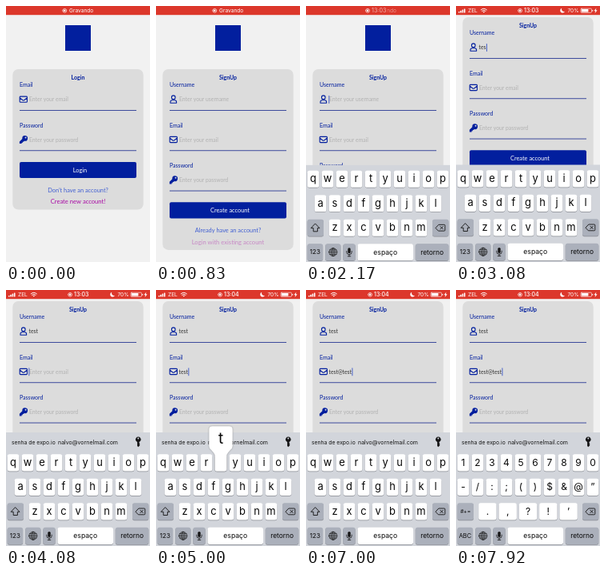
Recreate the animation shown at these times as an HTML page with a canvas. Size 180 px wide and 320 px high, loop 8000 ms.

```html
<!DOCTYPE html>
<html lang="pt">
<head>
<meta charset="utf-8">
<title>Sign up</title>
<style>
html, body { margin: 0; width: 100%; height: 100%; overflow: hidden; background: #f1f1f1; }
canvas { display: block; width: 180px; height: 320px; }
</style>
</head>
<body>
<canvas id="stage"></canvas>
<script>
const LOOP = 8000;
const BLUE = '#021f9e', RED = '#dc372b', PAGE = '#f1f1f1', CARD = '#dcdcdc';
const UI = 'Inter, sans-serif', APP = 'Lato, sans-serif';
const ROW = 50.3;           // distance between form fields
const KEY_W = 14.6, KEY_H = 21.2, PITCH = 18, KEY_ROW = 30.5, KEYS_TOP = 205.3, BOARD_TOP = 198.5;

const canvas = document.getElementById('stage');
const ctx = canvas.getContext('2d');
const scale = Math.max(1, window.devicePixelRatio || 1);
canvas.width = 180 * scale;
canvas.height = 320 * scale;

const typed = [
  { word: 'test', at: [2620, 2780, 2930, 3170] },
  { word: 'test@test', at: [4370, 4560, 4740, 4920, 5700, 6200, 6400, 6600, 6800] }
];
const letters = ['qwertyuiop', 'asdfghjkl', 'zxcvbnm'];
const symbols = ['1234567890', '-/:;()$&@”', '.,?!’'];

const progress = (t, from, to) => Math.min(1, Math.max(0, (t - from) / (to - from)));
const smooth = p => p * p * (3 - 2 * p);

function text(str, x, y, size, color, { font = APP, weight = 400, align = 'left' } = {}) {
  ctx.font = `${weight} ${size}px ${font}`;
  ctx.textAlign = align;
  ctx.textBaseline = 'alphabetic';
  ctx.fillStyle = color;
  ctx.fillText(str, x, y + size * 0.34);
}

function box(x, y, w, h, r, color) {
  ctx.fillStyle = color;
  ctx.beginPath();
  ctx.roundRect(x, y, w, h, r);
  ctx.fill();
}

function line(d, color, width = 1) {
  ctx.strokeStyle = color;
  ctx.lineWidth = width;
  ctx.lineJoin = ctx.lineCap = 'round';
  ctx.stroke(new Path2D(d));
}

function shape(d, color) {
  ctx.fillStyle = color;
  ctx.fill(new Path2D(d), 'evenodd');
}

function at(x, y, draw, alpha = 1) {
  ctx.save();
  ctx.translate(x, y);
  ctx.globalAlpha *= alpha;
  draw();
  ctx.restore();
}

// Field icons, centred on the origin
const icons = {
  Username() {
    line('M-2.3 -2.5a2.3 2.3 0 1 0 4.6 0a2.3 2.3 0 1 0 -4.6 0M-3.8 4.5V3.2Q-3.8 1 -1.5 1H1.5Q3.8 1 3.8 3.2V4.5Z', BLUE, 1.1);
  },
  Email() {
    line('M-3.7 -3.6H3.7Q4.6 -3.6 4.6 -2.7V2.7Q4.6 3.6 3.7 3.6H-3.7Q-4.6 3.6 -4.6 2.7V-2.7Q-4.6 -3.6 -3.7 -3.6ZM-4.4 -1.7L-.8 1Q0 1.5 .8 1L4.4 -1.7', BLUE, 1.1);
  },
  Password() {
    shape('M-1.5 -1.8a3.4 3.4 0 1 1 2.6 3.5L0 2.7H-1V3.9H-2.2V5.1H-4.9V2.4L-1.4 -1ZM1.8 -2.5a1 1 0 1 0 2 0a1 1 0 1 0 -2 0Z', BLUE);
  }
};

function field(name, i, value, focused) {
  const y = ROW * i, mid = 117 + y;
  text(name, 17, 99 + y, 7, BLUE);
  at(21.8, mid - .3, icons[name]);
  if (value) text(value, 28.5, mid, 6.8, '#333');
  else text(`Enter your ${name.toLowerCase()}`, 29, mid, 6.8, '#b2b2b2');
  if (focused) {
    ctx.font = `6.8px ${APP}`;
    box(28.4 + (value ? ctx.measureText(value).width + .6 : 0), mid - 5, .9, 10, .4, '#3653c4');
  }
  ctx.fillStyle = '#2c3b96';
  ctx.fillRect(17, 130 + y, 146, .9);
}

function form({ title, fields, button, question, link }, values, focus, linkAlpha) {
  const top = 144.6 + ROW * (fields.length - 1);
  const centre = { align: 'center' };
  box(8.3, 79, 163.4, top + 59.7 - 79, 7, CARD);
  text(title, 90, 89.3, 7, BLUE, { align: 'center', weight: 700 });
  fields.forEach((name, i) => field(name, i, values[i], focus === i));
  box(17, top, 146, 20.2, 2, BLUE);
  text(button, 90 + 2.5, top + 10.2, 7.4, '#fff', centre);
  text(question, 90, top + 35.6, 7.4, '#4260d2', centre);
  at(0, 0, () => text(link, 90, top + 49.8, 7.6, '#a90aa5', centre), linkAlpha);
}

const login = {
  title: 'Login', fields: ['Email', 'Password'], button: 'Login',
  question: 'Don’t have an account?', link: 'Create new account!'
};
const signUp = {
  title: 'SignUp', fields: ['Username', 'Email', 'Password'], button: 'Create account',
  question: 'Already have an account?', link: 'Login with existing account'
};

function key(x, y, w, label = '', size = 12.6, color = '#fff') {
  box(x, y + .7, w, KEY_H, 2.7, '#898c93');
  box(x, y, w, KEY_H, 2.7, color);
  text(label, x + w / 2, y + KEY_H / 2 - (size > 10 ? .4 : 0), size, '#080808', { font: UI, align: 'center' });
}

function keyPlace(char, rows, numeric) {
  const r = rows.findIndex(row => row.includes(char));
  const i = rows[r].indexOf(char);
  const y = KEYS_TOP + KEY_ROW * r;
  if (numeric && r === 2) return [28.2 + 25.3 * i, y, 22.4];
  return [1.7 + PITCH * i + (numeric ? 0 : [0, 9, 27][r]), y, KEY_W];
}

function popup(char, x, y) {
  at(x, y, () => {
    ctx.shadowColor = 'rgba(0,0,0,.35)';
    ctx.shadowBlur = 2 * scale;
    shape('M-3 -35H17.6Q22 -35 22 -31V-10Q22 -7 19 -5L16.4 -2Q14.6 0 14.6 3V19Q14.6 21.3 12 21.3H2.6Q0 21.3 0 19V3Q0 0 -1.8 -2L-4.4 -5Q-7.4 -7 -7.4 -10V-31Q-7.4 -35 -3 -35Z', '#fff');
    ctx.shadowColor = 'transparent';
    text(char, 7.3, -19.5, 19, '#080808', { font: UI, align: 'center' });
  });
}

function keyboard(t) {
  const s = Math.max(0, t - 1803) * .022;
  const rise = 1 - Math.exp(-s) * (1 + s);
  if (!rise) return;
  const numeric = (t >= 5330 && t < 5870) || t >= 7350;
  const rows = numeric ? symbols : letters;
  const bar = smooth(progress(t, 3640, 3800));
  const dark = '#abb0bb', ink = '#151515';

  at(0, (1 - rise) * 121.5, () => {
    ctx.fillStyle = '#d2d5db';
    ctx.fillRect(0, BOARD_TOP - 20.5 * bar, 180, 150);
    if (bar) at(0, (1 - bar) * 20, () => {
      text('senha de expo.io', 7, 190.5, 6.8, ink, { font: UI });
      text('nalvo@vornelmail.com', 65, 190.5, 7, ink, { font: UI });
      at(165.3, 189.5, () => shape('M-1.2 .6a3.4 3.4 0 1 1 2.4 0V1.8L2.2 2.7L1.2 3.5L2.2 4.5L0 6.7L-1.2 5.5ZM-1 -4a1 1 0 1 0 2 0a1 1 0 1 0 -2 0Z', ink));
    }, bar);

    for (const row of rows) for (const char of row) {
      const [x, y, w] = keyPlace(char, rows, numeric);
      key(x, y, w, char, numeric ? 12 : 12.9);
    }

    const y3 = KEYS_TOP + KEY_ROW * 2, y4 = KEYS_TOP + KEY_ROW * 3;
    key(1.7, y3, 20.3, numeric ? '#+=' : '', 6.6, dark);
    if (!numeric) at(11.8, y3 + 10.6, () => line('M0 -5L5.2 .4H2.6V4.6H-2.6V.4H-5.2Z', ink, .9));
    key(158, y3, 20.3, '', 8, dark);
    at(168.2, y3 + 10.6, () => line('M-6 0L-2.4 -3.9H4.6Q5.6 -3.9 5.6 -2.9V2.9Q5.6 3.9 4.6 3.9H-2.4ZM-.3 -1.7L3.1 1.7M3.1 -1.7L-.3 1.7', ink, .9));

    key(1.7, y4, 19.4, numeric ? 'ABC' : '123', numeric ? 7.4 : 8, dark);
    key(24.2, y4, 19.2, '', 8, dark);
    at(33.8, y4 + 10.5, () => line('M-5 0a5 5 0 1 0 10 0a5 5 0 1 0 -10 0ZM-2.3 0a2.3 5 0 1 0 4.6 0a2.3 5 0 1 0 -4.6 0ZM0 -5V5M-5 0H5M-4.2 -2.6H4.2M-4.2 2.6H4.2', ink, .7));
    key(46.4, y4, 15.2, '', 8, dark);
    at(54, y4 + 10.5, () => {
      box(-1.7, -5.4, 3.4, 7, 1.7, ink);
      line('M-3.2 -1.2V0Q-3.2 3 0 3Q3.2 3 3.2 0V-1.2M0 3V5.2M-1.8 5.2H1.8', ink, .8);
    });
    key(64.5, y4, 69.5, 'espaço', 8.6);
    key(136.8, y4, 41.5, 'retorno', 8.4, dark);

    for (const { word, at: times } of typed) times.forEach((time, i) => {
      if (t >= time && t < time + 135) popup(word[i], ...keyPlace(word[i], rows, numeric));
    });
  });
}

function statusBar(t) {
  const swap = smooth(progress(t, 2070, 2260));
  const details = smooth(progress(t, 2230, 2480));
  const shift = 6.8 * swap;
  const white = '#fff';
  ctx.fillStyle = RED;
  ctx.fillRect(0, 0, 180, 11.2);

  at(73.3 + shift, 5.8, () => {
    line('M-2.4 0a2.4 2.4 0 1 0 4.8 0a2.4 2.4 0 1 0 -4.8 0', white, .7);
    shape('M-1.2 0a1.2 1.2 0 1 0 2.4 0a1.2 1.2 0 1 0 -2.4 0', white);
  });
  if (swap < 1) {
    ctx.save();
    if (swap > .3) { ctx.beginPath(); ctx.rect(101.5, 0, 79, 12); ctx.clip(); }
    at(79 + shift, 0, () => text('Gravando', 0, 5.8, 6.6, white, { font: UI }), 1 - swap);
    ctx.restore();
  }
  at(78.3 + shift, 0, () => text(t < 4300 ? '13:03' : '13:04', 0, 5.8, 7, white, { font: UI, weight: 500 }), swap);

  if (details) at(0, 0, () => {
    for (let i = 0; i < 4; i++) box(3 + i * 2.3, 7 - i * 1.2, 1.6, 1.6 + i * 1.2, .4, white);
    text('ZEL', 15, 5.8, 6.6, white, { font: UI });
    line('M31.2 4.8Q34.8 1.6 38.4 4.8M32.6 6.2Q34.8 4.3 37 6.2', white, 1);
    shape('M33.6 7.3Q34.8 6.4 36 7.3L34.8 8.6Z', white);
    shape('M132.2 2.8A3 3 0 1 0 136 6.8A3 3 0 0 1 132.2 2.8Z', white);
    text('70%', 139.5, 5.8, 6.5, white, { font: UI });
    line('M157 3.2H168.5Q169.5 3.2 169.5 4.2V7.4Q169.5 8.4 168.5 8.4H157Q156 8.4 156 7.4V4.2Q156 3.2 157 3.2Z', white, .6);
    box(156.8, 4, 8.6, 3.6, .6, white);
    box(170.3, 4.8, .8, 2, .4, white);
    shape('M175.4 2.4L172.5 6.2H174.3L173.5 9.2L176.6 5.3H174.8Z', white);
  }, details);
}

function draw(t) {
  ctx.setTransform(scale, 0, 0, scale, 0, 0);
  ctx.fillStyle = PAGE;
  ctx.fillRect(0, 0, 180, 320);

  const scroll = 65 * smooth(progress(t, 2200, 2480));
  at(0, -scroll, () => {
    ctx.fillStyle = BLUE;
    ctx.fillRect(74, 24, 32, 32);
    if (t < 700) {
      form(login, [], -1, 1 - .8 * smooth(progress(t, 400, 550)));
    } else {
      const values = typed.map(({ word, at: times }) => word.slice(0, times.filter(time => t >= time + 65).length));
      const focus = t < 1740 ? -1 : t < 3600 ? 0 : 1;
      form(signUp, values, focus, .2 + .8 * smooth(progress(t, 750, 1000)));
    }
  });
  keyboard(t);
  statusBar(t);
}

const start = performance.now();
function tick() {
  draw((performance.now() - start) % LOOP);
  requestAnimationFrame(tick);
}
tick();
</script>
</body>
</html>
```
